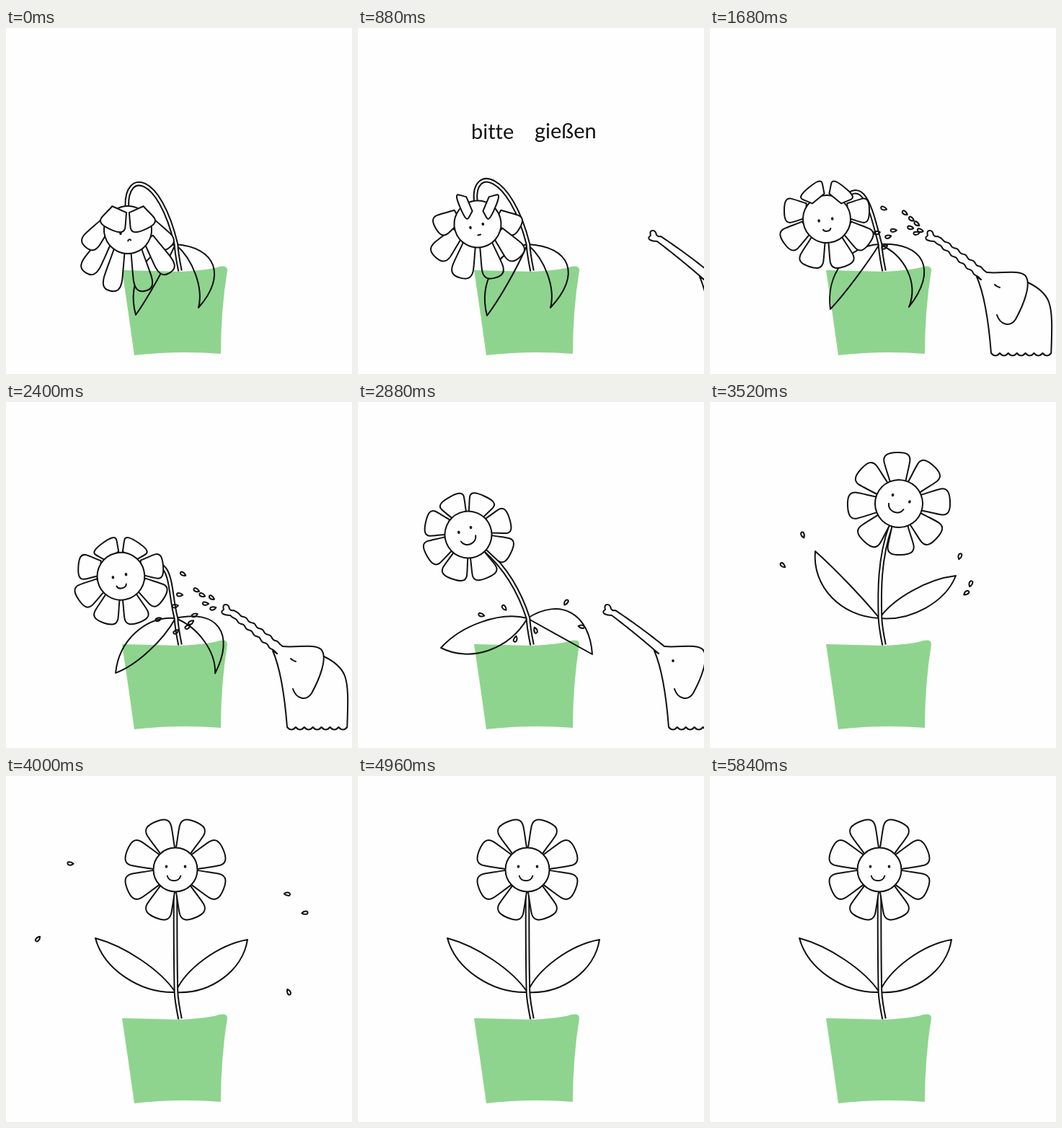
Animation of 480x480 px, one loop 6080 ms. Source, as an HTML page:

```html
<!DOCTYPE html>
<html lang="de">
<head>
<meta charset="utf-8">
<style>
html, body { margin: 0; width: 100%; height: 100%; overflow: hidden; background: #fdfefd; }
svg { display: block; width: 100vw; height: 100vh; isolation: isolate; }
path, ellipse, circle { stroke: #111; stroke-width: 2; stroke-linecap: round; stroke-linejoin: round; fill: none; }
.solid { fill: #fdfefd; }
.dot { fill: #111; stroke: none; }
.pot { fill: #8fd58f; stroke: none; mix-blend-mode: multiply; }
text { font: 29px Lato, sans-serif; font-variant-ligatures: none; fill: #111; }
</style>
</head>
<body>
<svg id="stage" viewBox="0 0 480 480">
  <rect width="480" height="480" fill="#fdfefd"/>
  <text id="word1" x="157" y="154"></text>
  <text id="word2" x="245" y="153"></text>
</svg>
<script>
const LOOP = 6080, STEP = 80, TURN = Math.PI / 180;
const JOINT = [235, 300], ROOT = [241.5, 337];

// head: x, y, radius; bow: pull of the lower stem; leaves: tip and the bulge of both edges
const poses = [
  { head: [169, 280, 33], turn: 0, sag: 42, open: 0, smile: -.2, tilt: -16, neck: -92,
    bow: [23, 100], left: [180, 398, 33, -3], right: [267, 388, 52, 16] },
  { head: [166, 272, 32.5], turn: 0, sag: 26, open: 0, smile: 0, tilt: -16, neck: -95,
    bow: [24, 100], left: [179, 399, 33, -4], right: [267, 388, 56, 16] },
  { head: [162, 265, 33], turn: 0, sag: 11, open: .1, smile: .35, tilt: -9, neck: -50,
    bow: [11, 45], left: [167, 390, 34, -3], right: [276, 387, 58, 26] },
  { head: [153, 184, 32.5], turn: -2, sag: 4, open: 0, smile: 1, tilt: -22, neck: 42,
    bow: [7, 25], left: [115, 341, 21, -33], right: [325, 350, 48, 0] },
  { head: [262, 141, 33], turn: 20, sag: 0, open: .9, smile: 1, tilt: 22, neck: 110,
    bow: [0, 35], left: [146, 207, 3, -37], right: [341, 241, 15, -25] },
  { head: [235, 130, 30.5], turn: 0, sag: 0, open: 1, smile: .8, tilt: 0, neck: 90,
    bow: [0, 40], left: [124, 225, 14, -29], right: [335, 227, 18, -31] }
];

// [time, value] tracks
const poseTrack = [[0, 0], [640, 1], [880, 1], [1280, 1.25], [1680, 2], [2000, 2.08], [2560, 2.37],
                   [2880, 3], [3520, 4], [3840, 5]];
const walkTrack = [[720, 165], [880, 104], [1200, 10], [1280, 0], [2640, 0], [2880, 41], [3200, 190]];

const lerp = (a, b, k) => Array.isArray(a) ? a.map((v, i) => lerp(v, b[i], k)) : a + (b - a) * k;
const polar = (x, y, r, a) => [x + r * Math.cos(a), y + r * Math.sin(a)];
const path = (...parts) => parts.map(p => Array.isArray(p) ? p.map(v => v.toFixed(2)).join(' ') : p).join(' ');
const rnd = i => { const s = Math.sin(i * 127.1 + 3.7) * 43758.5453; return s - Math.floor(s); };

function track(keys, t) {
  let [t0, v0] = keys[0];
  for (const [t1, v1] of keys) {
    if (t < t1) return t1 > t0 && t > t0 ? lerp(v0, v1, (t - t0) / (t1 - t0)) : v0;
    [t0, v0] = [t1, v1];
  }
  return v0;
}

// maps (along, across) on the line a-b to the stage
function frameOn([ax, ay], [bx, by], side = 1) {
  const dx = bx - ax, dy = by - ay, len = Math.hypot(dx, dy);
  return (u, v) => [ax + dx * u - side * dy / len * v, ay + dy * u + side * dx / len * v];
}

function petal(base, tip, w) {
  const f = frameOn(base, tip), p = (u, v) => f(u, v * w);
  return path('M', p(0, -.3), 'C', p(.3, -.38), p(.5, -.46), p(.7, -.5), 'C', p(.93, -.53), p(1, -.34), p(1, 0),
              'C', p(1, .34), p(.93, .53), p(.7, .5), 'C', p(.5, .46), p(.3, .38), p(0, .3), 'Z');
}

function leaf([x, y, up, low], side) {
  const tip = [x, y], f = frameOn(JOINT, tip, side);
  return path('M', JOINT, 'C', f(.25, up), f(.7, up), tip, 'C', f(.75, low), f(.3, low), JOINT);
}

const stage = document.getElementById('stage');
function add(tag, cls, attrs = {}, parent = stage) {
  const el = document.createElementNS('http://www.w3.org/2000/svg', tag);
  if (cls) el.setAttribute('class', cls);
  set(el, attrs);
  return parent.appendChild(el);
}
function set(el, attrs) { for (const k in attrs) el.setAttribute(k, attrs[k]); }
function show(el, on) { el.style.display = on ? '' : 'none'; }
const many = (n, f) => Array.from({ length: n }, (_, i) => f(i));

const words = ['bitte', 'gießen'].map((s, i) => [document.getElementById('word' + (i + 1)), s]);
const leaves = many(2, () => add('path'));
const stem = many(2, i => add('path'));
stem.forEach((el, i) => {
  el.style.cssText = `stroke-width:${i ? 2.6 : 6.6};stroke:${i ? '#fdfefd' : '#111'};stroke-linecap:butt`;
});
const petals = many(8, () => add('path', 'solid'));
const face = add('g');
const cheek = add('circle', 'solid', {}, face);
const eyes = many(2, () => add('ellipse', 'dot', { rx: 1.8, ry: 2.2 }, face));
const mouth = add('path', '', {}, face);
const topPetals = many(2, () => add('path', 'solid'));

const elephant = add('g');
const hem = 'q6 7 11.9 0'.repeat(7);
const torso = 'M376 349L370 345C380 368 386 400 390 451' + hem + 'C474 425 476 396 470 380Q464 364 441 353';
add('path', 'solid', { d: torso + 'L432 340 384 339Z', style: 'stroke:none' }, elephant);
add('path', '', { d: torso }, elephant);
add('path', '', { d: 'M384 339C404 341 428 335 437 343C447 354 435 384 424 404C417 415 403 413 398 398' }, elephant);
const trunk = add('path', '', {}, elephant);
const blink = add('path', '', { d: 'M395 356Q398 359 402 360' }, elephant);
const eye = add('ellipse', 'dot', { cx: 396, cy: 359, rx: 1.8, ry: 2 }, elephant);

const drops = many(30, () => add('path', '', { d: 'M-4.5 0Q-1 -3.6 2.6 -2.2Q4.8 -.5 3 1.4Q-1 2.6 -4.5 0Z' }));
add('path', 'pot', {
  d: 'M161 336Q205 337 241 338Q283 336 296 331Q307 329 307 336Q298 392 298 452Q240 447 178 454Q170 396 161 336Z' });

function drawFlower(t) {
  const pos = track(poseTrack, t), i = Math.min(4, Math.floor(pos)), p = {};
  for (const k in poses[i]) p[k] = lerp(poses[i][k], poses[i + 1][k], pos - i);
  const [x, headY, r] = p.head;
  const y = headY - 58 * Math.max(0, 1 - Math.abs(t - 3200) / 320);

  leaves.forEach((el, j) => set(el, { d: leaf(j ? p.right : p.left, j ? -1 : 1) }));
  const top = polar(x, y, r, p.neck * TURN), pull = polar(...top, 48, p.neck * TURN);
  const bend = [JOINT[0] - p.bow[0], JOINT[1] - p.bow[1]];
  const d = path('M', ROOT, 'Q', [236.5, 312], [236, 300], 'C', bend, pull, top);
  stem.forEach(el => set(el, { d }));

  for (let j = 0; j < 8; j++) {
    const a = (p.turn - 112.5 + 45 * j) * TURN;
    const tip = polar(x, y, 63 + 9 * p.open, a);
    tip[1] += p.sag * (1 - .4 * Math.sin(a));
    const outline = petal(polar(x, y, r * .93, a), tip, j < 2 ? 36 : 36 - p.sag / 4);
    const front = j < 2 && pos < 2.2;
    set(petals[j], { d: front ? '' : outline });
    if (j < 2) set(topPetals[j], { d: front ? outline : '' });
  }

  const happy = Math.max(0, p.smile), look = 2 - 10 * happy * happy;
  const w = 2 + 9 * happy, h = 11 * p.smile, m = look + 13;
  set(face, { transform: `translate(${x} ${y}) rotate(${p.tilt})` });
  set(cheek, { r });
  eyes.forEach((el, j) => set(el, { cx: (j ? 1 : -1) * (9 + 4 * p.open) + .5 - 2.5 * (1 - p.open), cy: look }));
  set(mouth, { d: path('M', [-2 - w, m], 'C', [-2 - w * .8, m + h], [-2 + w * .8, m + h], [-2 + w, m]) });
}

// quadratic curve with ripples running along it
function ripple(a, b, c, amp, phase) {
  let d = '';
  for (let i = 0; i <= 40; i++) {
    const k = i / 40;
    const [x, y] = lerp(lerp(a, b, k), lerp(b, c, k), k);
    const s = amp * Math.sin(k * 38 + phase) * Math.min(1, 6 * k, 6 - 6 * k);
    d += path('L', [x - .6 * s, y + .8 * s]);
  }
  return d;
}

function drawElephant(t) {
  const spray = t >= 1360 && t < 2640, amp = spray ? 1 : 0;
  show(elephant, t >= 720 && t < 3200);
  show(blink, spray);
  show(eye, !spray);
  set(elephant, { transform: `translate(${track(walkTrack, t)} 0)` });
  set(trunk, { d: 'M376 349' + ripple([376, 349], [344, 321], [311, 296], amp, t / 60) +
                  'Q305 296 301 294Q297 291 302 288Q300 281 305 281Q309 281 310 287Q312 290 316 289' +
                  ripple([316, 289], [352, 313], [384, 339], amp, t / 60) });
}

function liveDrops(t) {
  const out = [];
  const fly = (x, y, vx, vy, g, age) =>
    out.push([x + vx * age, y + vy * age + g * age * age / 2, Math.atan2(vy + g * age, vx) / TURN]);
  for (let i = 0; i < 42; i++) {
    const age = t - 1390 - i * 25;
    if (age < 40 || age > 360) continue;
    const a = -.8 + 1.3 * rnd(i), v = .2 + .07 * rnd(i + 60);
    fly(301, 284, -v * Math.cos(a), v * Math.sin(a), .0002, age);
  }
  // splashes off the leaves, moving outwards
  if (t >= 2640 && t < 3280)
    for (const [x, y] of [[171, 295], [203, 285], [289, 278], [310, 312], [218, 329], [246, 317]])
      fly(x, y, (x - 238) * .0008, (y - 305) * .002, .0003, t - 2880);
  // drops shaken off by the swing: place and speed at 3520 ms
  if (t >= 3360 && t < 4400)
    for (const p of [[129, 184, -.083, -.251], [101, 226, -.119, -.12], [347, 214, .09, -.224],
                     [362, 252, .11, -.249], [356, 265, .075, -.047]])
      fly(...p, .0005, t - 3520);
  return out;
}

function draw(t) {
  drawFlower(t);
  drawElephant(t);
  const live = liveDrops(t);
  drops.forEach((el, i) => {
    show(el, live[i]);
    if (live[i]) set(el, { transform: `translate(${live[i][0]} ${live[i][1]}) rotate(${live[i][2]})` });
  });
  let typed = t < 1200 ? Math.round(t / 640 * 11) : 0;
  for (const [el, s] of words) {
    el.textContent = s.slice(0, Math.max(0, typed));
    typed -= s.length;
  }
}

const start = performance.now();
function tick() {
  const t = (performance.now() - start) % LOOP;
  draw(Math.floor(t / STEP) * STEP);
  requestAnimationFrame(tick);
}
tick();
</script>
</body>
</html>
```
